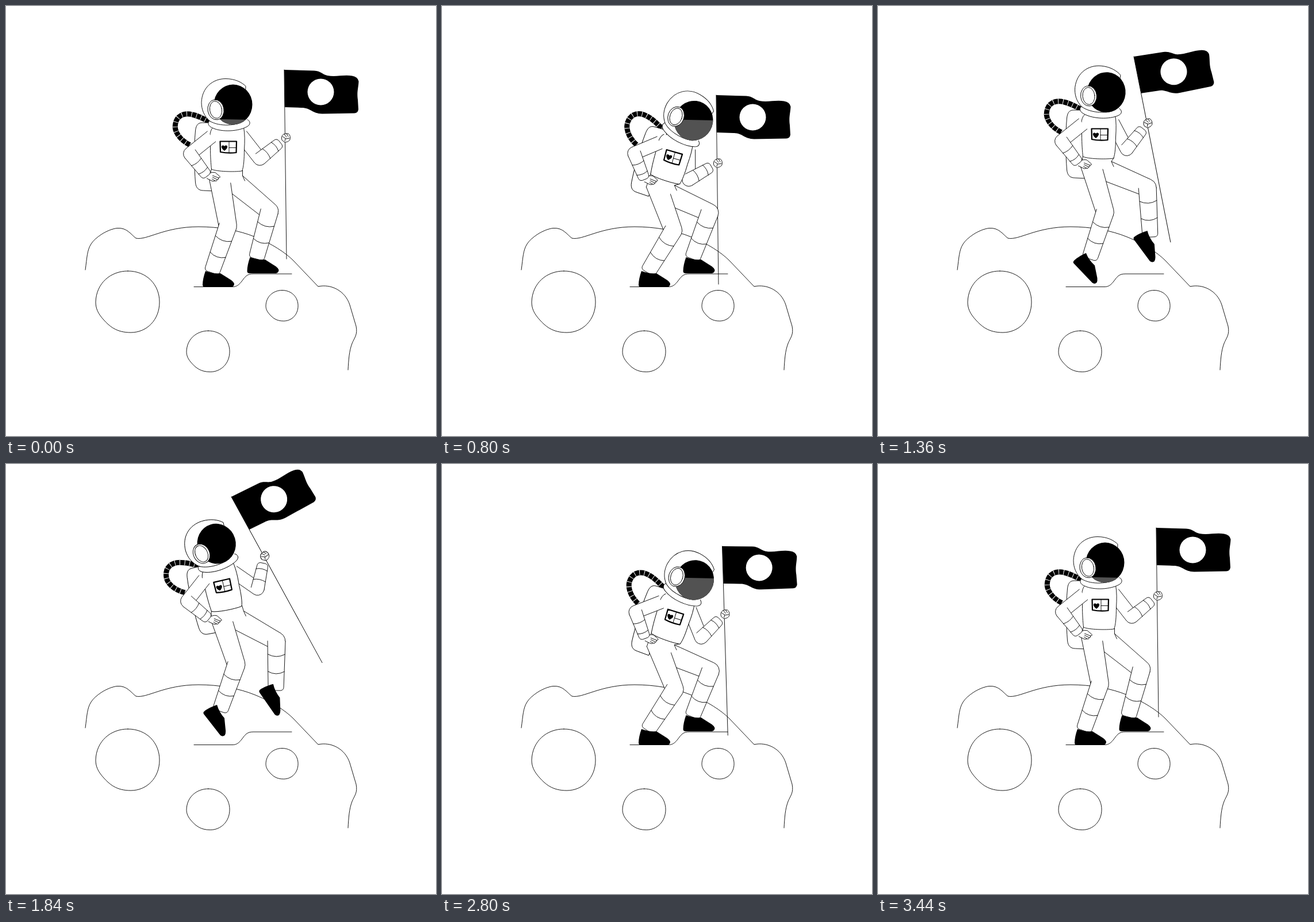
Write an HTML page that moves like this. It is 748x748 px and loops after 4 s.

```html
<!DOCTYPE html>
<html lang="en">
<head>
<meta charset="utf-8">
<title>Astronaut on the moon</title>
<style>
  html, body { margin: 0; width: 100%; height: 100%; overflow: hidden; background: #fff; }
  svg { display: block; width: 100%; height: 100%; }
  .ink { fill: none; stroke: #000; stroke-width: .9; stroke-linecap: round; stroke-linejoin: round; }
  .skin { fill: #fff; }
  .solid { fill: #000; stroke: none; }
  .bare { stroke: none; }
  .hose { stroke-width: 9; stroke-linecap: butt; }
  .rings { stroke: #fff; stroke-dasharray: 1 7.5; }
  .frame { stroke-width: 2.2; }
  .crater { vector-effect: non-scaling-stroke; }
</style>
</head>
<body>
<svg viewBox="0 0 748 748">
  <defs>
    <path id="crater" class="crater" d="M212 461C245 461 267 485 267 515C267 546 245 568 217 568C192 568 180 557 170 546C160 535 156 526 156 515C157 482 182 461 212 461Z"/>
    <path id="shoe" class="solid" d="M-11 -2C-14 6 -16 15 -16 22Q-16 26 -12 26H34Q39 25 39 20Q38 17 34 14L15 2Q1 3 -11 -2Z"/>
    <path id="tube" d="M-66 -3C-86 -13 -94 -28 -92 -39C-90 -54 -77 -60 -62 -56C-48 -53 -41 -47 -31 -43"/>
    <clipPath id="shade"><path d="M250 198L380 197L520 200V400H250Z"/></clipPath>
  </defs>

  <g class="ink">
    <path d="M138 459C141 437 141 425 148 414C155 403 175 389 193 386.5C210 385 217 397 226 404C245 408 275 384 335 384C370 384 405 390 434 402C470 417 490 433 500 443L543 488C565 483 590 495 598 520L609 557C612 572 606 577 602 587C597 600 596 615 595 633"/>
    <use href="#crater"/>
    <use href="#crater" transform="translate(452 494.5) scale(.505 .5) translate(-156 -461)"/>
    <use href="#crater" transform="translate(314 565) scale(.676 .668) translate(-156 -461)"/>
    <path d="M327 488.5H394C402 488.5 406 484 410 479C416 471 419 466 430 466H497"/>
  </g>

  <g id="flag" class="ink">
    <path d="M0 0L4 329"/>
    <path class="solid" d="M0 0L52 1.5C64 2 66 8 75 10C90 13 103 8 118 10.5Q128 12 129.5 20C129 32 126 38 128 52L129 69Q128 75 122 75.5L66 76.5C48 76 46 66 30 66L1 65Z"/>
    <circle class="skin bare" cx="63.5" cy="38.5" r="23"/>
  </g>

  <g id="back" class="ink">
    <use href="#tube" class="hose"/>
    <use href="#tube" class="hose rings"/>
    <path class="skin" d="M-22 -42H-45C-53 -42 -56 -37 -57 -28C-60 5 -59 35 -57 62C-56 72 -51 76 -43 76L-22 77Z"/>
  </g>

  <g id="armR" class="ink"></g>
  <g id="fist" class="ink">
    <path class="skin" d="M-7 4C-9 -2 -6 -6 -1 -7L4 -7C7 -5 8 -1 7 3C6 6 2 8 -2 8Z"/>
    <path d="M-3 -6L1 -1M1 -7L4 -2M-6 -2L0 2L6 1M-1 2L-2 6"/>
  </g>
  <g id="legR" class="ink"></g>
  <use id="shoeR" href="#shoe"/>
  <g id="legL" class="ink"></g>
  <use id="shoeL" href="#shoe"/>
  <g id="hips" class="ink"></g>

  <g id="torso" class="ink">
    <path class="skin" d="M-26 -34C-34 -28 -32 -10 -31 0C-31 18 -30 30 -29 39C-20 43 10 44 24 42C27 36 28 20 28 5C29 -10 29 -22 27 -34"/>
    <path class="frame" d="M-14 -9.5H14.5L14 10C5 11 -6 10.5 -13.5 9Z"/>
    <path d="M1.5 -9V10M1.5 1.5H14"/>
    <path class="solid" d="M-6.5 7C-16 0 -10 -5 -6.5 -1C-3 -5 3 0 -6.5 7Z"/>
  </g>

  <g id="palm" class="ink">
    <path class="skin" d="M0 -5L4 -4C9 -6 12 -6 15 -5L23 2Q23 4 20 4Q21 7 18 7Q17 11 14 9Q11 11 8 9L0 5"/>
    <path d="M10 0L20 4M10 3L18 7M9 6L14 9"/>
  </g>
  <g id="armL" class="ink"></g>

  <g id="head" class="ink">
    <path class="skin" d="M-29 29C-35 34 -32 40 -24 43C-8 50 20 49 36 40C42 36 41 31 36 28"/>
    <path class="skin" d="M-29 31C-40 22 -44 10 -44 -2C-43 -28 -24 -43 -2 -43C14 -43 26 -37 33 -30L30 30C18 39 -12 41 -29 31Z"/>
    <ellipse class="solid" cx="11" cy="2" rx="33.5" ry="35"/>
  </g>
  <g clip-path="url(#shade)"><ellipse id="glare" cx="11" cy="2" rx="33.5" ry="35" fill="#525252"/></g>
  <g id="ear" class="ink">
    <g transform="translate(-19 11) rotate(-10)">
      <ellipse class="skin" rx="14" ry="17.5"/>
      <ellipse class="skin" rx="10.5" ry="15"/>
    </g>
  </g>
</svg>

<script>
const LOOP = 4000, STEP = 80;
// rest, crouch, take-off, peak, landing, crouch, rest
const KEYS = [0, 800, 1360, 1840, 2400, 2800, 3440];
const LAST = KEYS.length - 1;
const $ = id => document.getElementById(id);

// Smooth curve through the key poses, flat at each turning point.
function track(...poses) {
  poses.push(poses[0]);
  const slope = (i, c) => {
    if (i === 0 || i === LAST) return 0;
    const [u, v, w] = [poses[i - 1][c], poses[i][c], poses[i + 1][c]];
    return (v - u) * (w - v) <= 0 ? 0 : (w - u) / (KEYS[i + 1] - KEYS[i - 1]);
  };
  return t => {
    if (t >= KEYS[LAST]) return poses[0];
    const i = KEYS.findIndex((k, n) => t < KEYS[n + 1]);
    const span = KEYS[i + 1] - KEYS[i], s = (t - KEYS[i]) / span;
    const ease = s * s * (3 - 2 * s);
    return poses[i].map((v, c) => v + (poses[i + 1][c] - v) * ease
      + span * s * (1 - s) * (slope(i, c) * (1 - s) - slope(i + 1, c) * s));
  };
}

// Only flag, body and feet are posed; the limbs follow from them.
const ground = [0, 0, 0];
const flagAt = track([484, 111, 0], [477, 155, 0], [445, 88, -10.5], [392, 57, -28], [425, 77, -17.5], [487.5, 143, -1]);
// chest x, y, lean, nod
const bodyAt = track([386.5, 245, 0, 0], [401.5, 263, 16, 14], [385.5, 223, 0, 5], [377, 212, -13, -4], [390, 234.5, 3, -3], [403.5, 266, 17.5, 10]);
// lift of both feet, swing of the front one
const hopAt = track(ground, ground, [24, 38, 38], [34, 46, 34], [15, 15, 11], ground);

const place = (id, [x, y, a = 0]) => $(id).setAttribute('transform', `translate(${x} ${y}) rotate(${a})`);
const fmt = p => p.map(v => v.toFixed(2)).join(' ');
const line = (...points) => 'M' + points.map(fmt).join('L');
const shape = (fill, stroke) => `<path class="skin bare" d="${fill}"/><path d="${stroke}"/>`;

function attach([x, y, a], px, py) {
  const r = a * Math.PI / 180, c = Math.cos(r), s = Math.sin(r);
  return [x + px * c - py * s, y + px * s + py * c];
}

// Point maker for a bone: l along it from a, w across.
function bone(a, b) {
  const len = Math.hypot(b[0] - a[0], b[1] - a[1]);
  const dx = (b[0] - a[0]) / len, dy = (b[1] - a[1]) / len;
  const at = (l, w) => [a[0] + dx * l - dy * w, a[1] + dy * l + dx * w];
  return { len, at };
}

// Elbow or knee between two ends; side picks the way it bends.
function joint(a, b, l1, l2, side) {
  const { len, at } = bone(a, b);
  const d = Math.min(len, l1 + l2);
  const x = (d * d + l1 * l1 - l2 * l2) / (2 * d);
  return at(x, side * Math.sqrt(Math.max(0, l1 * l1 - x * x)));
}

function upper(a, b, wa, wb, trim) {
  const { len, at } = bone(a, b);
  const side = line(at(0, wa), at(len, wb)) + `A${wb} ${wb} 0 0 0 ${fmt(at(len, -wb))}L`;
  return shape(side + fmt(at(0, -wa)), side + fmt(at(trim, -wa + (wa - wb) * trim / len)));
}

function lower(a, b, wa, wb, bands, sag) {
  const { len, at } = bone(a, b);
  const body = line(at(0, wa), at(len - 5, wb)) + `Q${fmt(at(len, wb))} ${fmt(at(len + 1, wb - 5))}`
    + `L${fmt(at(len + 1, 5 - wb))}Q${fmt(at(len, -wb))} ${fmt(at(len - 5, -wb))}L${fmt(at(0, -wa))}`;
  const rings = bands.map(d => {
    const l = len - d, w = wa + (wb - wa) * l / len;
    return `M${fmt(at(l, w))}Q${fmt(at(l + sag * 2, 0))} ${fmt(at(l, -w))}`;
  });
  return shape(body, body + rings.join(''));
}

const leg = (hip, knee, foot, trim) =>
  upper(hip, knee, 18, 15.5, trim) + lower(knee, foot, 15.5, 13.5, [62, 32], 4);
const arm = (shoulder, elbow, wrist) =>
  upper(shoulder, elbow, 11.5, 11.5, 0) + lower(elbow, wrist, 11.5, 9.5, [30, 11], 2);

// A foot tips onto its toe as it rises.
const foot = (x, y, lift, swing) => [x + swing, y - lift, 58 * (1 - Math.exp(-lift / 15))];

function drawLegs(body, [liftL, liftR, swing]) {
  const footL = foot(358, 463, liftL, liftL * .42), footR = foot(435.5, 439, liftR, swing);
  const hipL = attach(body, -15.5, 52), hipR = attach(body, 13.5, 64);
  const kneeL = joint(hipL, footL, 87, 85, -1), kneeR = joint(hipR, footR, 75.5, 85, -1);
  $('legL').innerHTML = leg(hipL, kneeL, footL, 14);
  $('legR').innerHTML = leg(hipR, kneeR, footR, 0);
  place('shoeL', footL);
  place('shoeR', footR);

  const left = attach(body, -29, 38), right = attach(body, 25, 41);
  const outL = bone(hipL, kneeL).at(0, 18), outR = bone(hipR, kneeR).at(0, -18);
  const crease = [outR[0] + 4, outR[1] + 9];
  $('hips').innerHTML = shape(line(left, outL, hipL, hipR, outR, right),
    line(left, outL) + line(right, outR, crease));
}

function drawArms(body, flag) {
  const grip = attach(flag, 3, 118), shoulderR = attach(body, 23, -20);
  const elbowR = joint(shoulderR, grip, 52, 58.5, 1);
  $('armR').innerHTML = arm(shoulderR, elbowR, bone(grip, elbowR).at(14, 0));
  place('fist', [...grip, flag[2]]);

  const wrist = attach(body, -37, 50), shoulderL = attach(body, -29, -18);
  $('armL').innerHTML = arm(shoulderL, joint(shoulderL, wrist, 48, 48, 1), wrist);
  place('palm', wrist);
}

function draw(t) {
  const flag = flagAt(t), body = bodyAt(t), tilt = body[2] + body[3];
  const neck = [...attach(body, 2.5, -37), tilt];
  const head = [...attach(neck, -5, -38.5), tilt];
  place('flag', flag);
  ['back', 'torso'].forEach(id => place(id, body));
  ['head', 'glare', 'ear'].forEach(id => place(id, head));
  drawLegs(body, hopAt(t));
  drawArms(body, flag);
}

const start = performance.now();
function tick(now) {
  const t = Math.max(0, now - start) % LOOP;
  draw(Math.floor(t / STEP) * STEP);
  requestAnimationFrame(tick);
}
tick(start);
</script>
</body>
</html>
```
